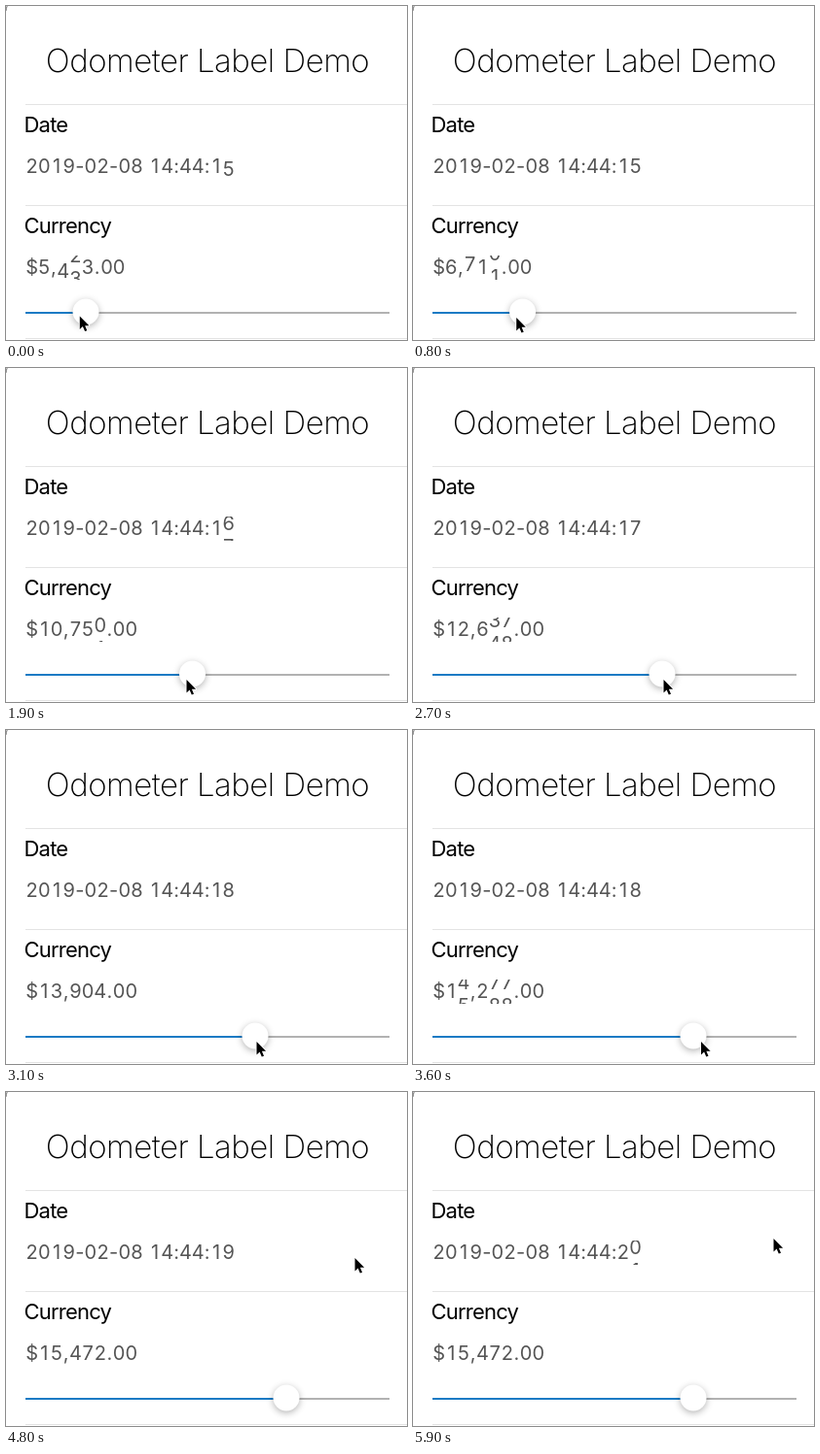
These frames come from a looping animation (412 px wide and 344 px high, 6000 ms). An HTML page with a canvas:

```html
<!DOCTYPE html>
<html lang="en">
<head>
<meta charset="utf-8">
<title>Odometer Label Demo</title>
<style>
  html, body { margin: 0; width: 100%; height: 100%; overflow: hidden; background: #fff; }
  canvas { display: block; }
</style>
</head>
<body>
<canvas id="stage" width="412" height="344"></canvas>
<script>
const ctx = document.getElementById('stage').getContext('2d');
const LOOP = 6000, STEP = 100;
const ROLL = 200, ROLL_GAP = 210, CLOCK_LEAD = 157;
const LINE = 24;
const CHAR_WIDTH = { '-': 9.5, ' ': 5.8, ':': 6.1, ',': 6.7, '.': 6.7 };

// Each drag moves the knob to x and rolls through its amounts one after another;
// grip is where the pointer ends up relative to the knob.
const drags = [
  { start: -148, end: 500, x: 104, grip: -7, amounts: [5433, 5782, 6419] },
  { start: 660, end: 1100, x: 131, grip: -5, amounts: [6811, 7782] },
  { start: 1636, end: 1900, x: 191.5, grip: -6, amounts: [10750, 10751] },
  { start: 2404, end: 2700, x: 256, grip: 1.5, amounts: [12637, 12648, 13904] },
  { start: 3304, end: 3600, x: 288, grip: 8, amounts: [14277, 15288, 15472] }
];
const knobMoves = drags.map(d => ({ start: d.start, end: d.end, to: [d.x] }));
const cursorMoves = [
  ...drags.map(d => ({ start: d.start, end: d.end, to: [d.x + d.grip, 321] })),
  { start: 3800, end: 4100, to: [343, 172] },
  { start: 4700, end: 4800, to: [358.5, 171] },
  { start: 4800, end: 5000, to: [370.5, 151] }
];
const rolls = drags.flatMap(d =>
  d.amounts.map((value, i) => ({ start: d.start + i * ROLL_GAP, value })));

const clamp = v => Math.max(0, Math.min(1, v));
const ease = u => u * u * (3 - 2 * u);
const rollProgress = elapsed => ease(clamp(elapsed / ROLL));

// Position at time t after applying the moves in order.
function follow(from, moves, t) {
  return moves.reduce((pos, { start, end, to }) => {
    const u = clamp((t - start) / (end - start));
    return pos.map((v, i) => v + (to[i] - v) * u);
  }, from);
}

function text(str, x, y, font, color, align = 'left', spacing = 0) {
  ctx.font = font;
  ctx.fillStyle = color;
  ctx.textAlign = align;
  ctx.letterSpacing = spacing + 'px';
  ctx.fillText(str, x, y);
}

// Each changed digit rolls upwards from its old value to its new one.
function odometer(from, to, progress, baseline) {
  const glyph = (c, x, y) => text(c, x, y, '20px Inter, sans-serif', '#555', 'center');
  const old = from.padStart(to.length, '0');
  let x = 20.2;
  ctx.save();
  ctx.beginPath();
  ctx.rect(0, baseline - 19, 412, 25);
  ctx.clip();
  [...to].forEach((char, i) => {
    const width = CHAR_WIDTH[char] || 12.7, mid = x + width / 2;
    const start = parseInt(old[i], 10);
    if (/\d/.test(char) && start >= 0) {
      const travel = (Number(char) - start + 10) % 10;
      const pos = start + travel * progress;
      const whole = Math.floor(pos), shift = (pos - whole) * LINE;
      glyph(String(whole % 10), mid, baseline - shift);
      if (shift > 0) glyph(String((whole + 1) % 10), mid, baseline - shift + LINE);
    } else {
      glyph(char, mid, baseline);
    }
    x += width;
  });
  ctx.restore();
}

function drawClock(t) {
  const beat = t + CLOCK_LEAD;
  const count = Math.floor(beat / 1000);
  const stamp = n => '2019-02-08 14:44:' + (14 + n);
  odometer(stamp(count), stamp(count + 1), rollProgress(beat % 1000), 172);
}

function drawAmount(t) {
  const money = n => '$' + n.toLocaleString('en-US') + '.00';
  const current = rolls.filter(r => r.start <= t).length - 1;
  const { start, value } = rolls[current];
  const before = current ? rolls[current - 1].value : 5303;
  odometer(money(before), money(value), rollProgress(t - start), 276);
}

function drawSlider(x) {
  ctx.fillStyle = '#b2b2b2';
  ctx.fillRect(20, 315, 374, 2);
  ctx.fillStyle = '#1b7bc4';
  ctx.fillRect(20, 315, x - 20, 2);
  ctx.save();
  ctx.shadowColor = 'rgba(0,0,0,0.3)';
  ctx.shadowBlur = 7;
  ctx.shadowOffsetY = 2;
  ctx.fillStyle = '#fff';
  ctx.beginPath();
  ctx.arc(x, 315, 13.5, 0, Math.PI * 2);
  ctx.fill();
  ctx.restore();
}

function drawCursor(x, y) {
  ctx.save();
  ctx.translate(x, y);
  const arrow = new Path2D('M0 0V13.5L3.1 10.6L5.3 15.6L7.5 14.7L5.4 9.8H9.6Z');
  ctx.lineJoin = 'round';
  ctx.lineWidth = 2;
  ctx.strokeStyle = '#fff';
  ctx.stroke(arrow);
  ctx.fillStyle = '#000';
  ctx.fill(arrow);
  ctx.restore();
}

function drawPage() {
  ctx.fillStyle = '#fff';
  ctx.fillRect(0, 0, 412, 344);
  ctx.strokeStyle = '#777';
  ctx.lineWidth = 1;
  ctx.beginPath();
  ctx.moveTo(1.2, 0);
  ctx.quadraticCurveTo(0.3, 2, 0, 5);
  ctx.stroke();
  ctx.fillStyle = '#e3e3e3';
  for (const y of [101, 205, 342]) ctx.fillRect(20, y, 392, 1);
  text('Odometer Label Demo', 207, 68, '200 33px Inter, sans-serif', '#000', 'center', -0.5);
  const heading = '22px Inter, sans-serif';
  text('Date', 18.5, 130, heading, '#000', 'left', -0.8);
  text('Currency', 18.5, 234, heading, '#000', 'left', -0.8);
}

function render(now) {
  const t = Math.floor((now % LOOP) / STEP) * STEP;
  drawPage();
  drawClock(t);
  drawAmount(t);
  drawSlider(follow([75.5], knobMoves, t)[0]);
  drawCursor(...follow([69.5, 319], cursorMoves, t));
}

let origin;
function tick(now) {
  origin ??= now;
  render(now - origin);
  requestAnimationFrame(tick);
}
render(0);
requestAnimationFrame(tick);
</script>
</body>
</html>
```
